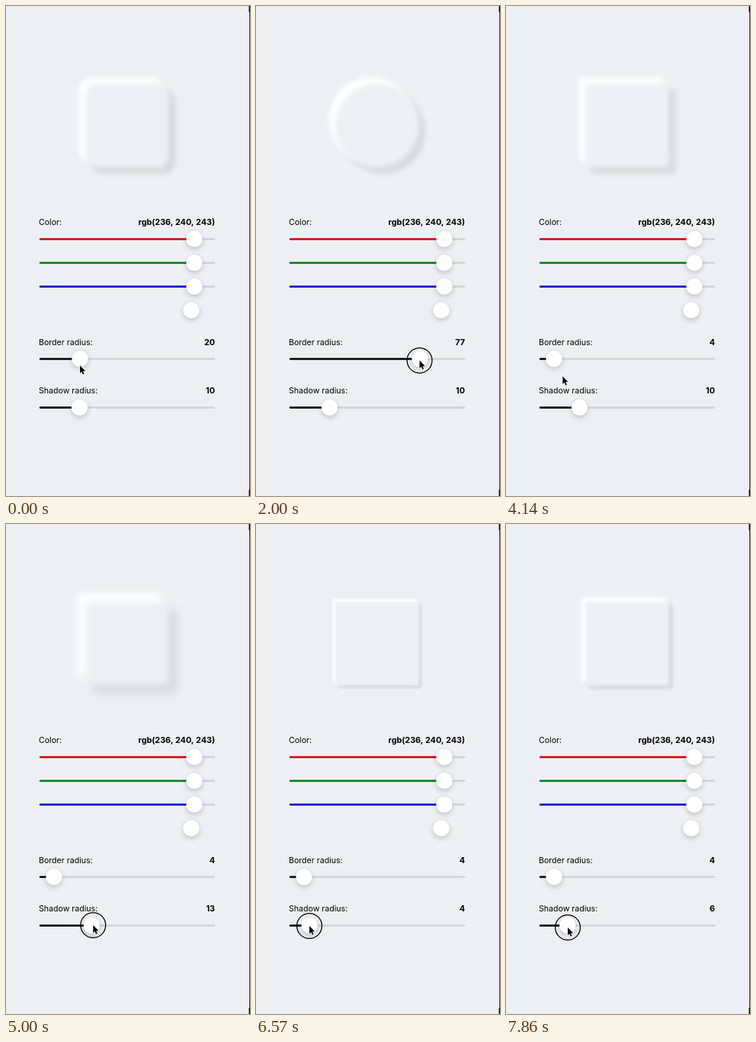
An HTML page with a canvas that plays this animation: 320 px wide and 640 px high, repeating every 8000 ms.

```html
<!DOCTYPE html>
<html lang="en">
<head>
<meta charset="utf-8">
<title>Soft shadow controls</title>
<style>
html, body { margin: 0; width: 100%; height: 100%; overflow: hidden; background: #ecf0f4; }
canvas { display: block; width: 320px; height: 640px; }
</style>
</head>
<body>
<canvas id="stage"></canvas>
<script>
const LOOP = 8000, FPS = 7;
const BG = '#ecf0f4';
const SCALE = 0.785; // points to stage pixels
const TRACK = { left: 44, right: 274, min: 54.5, span: 209 };
const THUMB_LAG = 38, LABEL_LAG = 73;

// Pointer path as [time, position] stops, eased between stops
const pathX = [
  [0, 97], [440, 97], [1900, 215], [1950, 215], [3472, 63], [3940, 63], [4460, 96.5],
  [4500, 96.5], [5400, 127], [6570, 70], [6600, 70], [7050, 51], [7100, 51], [7860, 81]
];
const pathY = [
  [0, 469.5], [285, 463], [3940, 463], [4460, 524], [5570, 524], [6570, 525], [7860, 527]
];

const canvas = document.getElementById('stage');
const ctx = canvas.getContext('2d');
const dpr = window.devicePixelRatio || 1;
canvas.width = 320 * dpr;
canvas.height = 640 * dpr;

const clamp = (v, lo, hi) => Math.min(hi, Math.max(lo, v));

function follow(path, t) {
  if (t <= path[0][0]) return path[0][1];
  for (let i = 1; i < path.length; i++) {
    const [t0, a] = path[i - 1], [t1, b] = path[i];
    if (t <= t1) {
      const u = (t - t0) / (t1 - t0);
      return a + (b - a) * u * u * (3 - 2 * u);
    }
  }
  return path[path.length - 1][1];
}

const borderX = t => follow(pathX, clamp(t, 440, 3900));
const shadowX = t => follow(pathX, Math.max(t, 4460));
const ratio = x => clamp((x - TRACK.min) / TRACK.span, 0, 1);

function text(str, x, y, bold) {
  ctx.font = bold ? '700 10.8px Inter, sans-serif' : '400 10.6px Inter, sans-serif';
  ctx.textAlign = bold ? 'right' : 'left';
  ctx.fillStyle = '#000';
  ctx.fillText(str, x, y);
}

function line(x0, x1, y, color) {
  ctx.strokeStyle = color;
  ctx.lineWidth = 2.4;
  ctx.lineCap = 'round';
  ctx.beginPath();
  ctx.moveTo(x0 + 1, y);
  ctx.lineTo(x1 - 1, y);
  ctx.stroke();
}

function thumb(x, y) {
  ctx.save();
  ctx.shadowColor = 'rgba(0,0,0,0.2)';
  ctx.shadowBlur = 7 * dpr;
  ctx.shadowOffsetY = 2.5 * dpr;
  ctx.fillStyle = '#fff';
  ctx.beginPath();
  ctx.arc(x, y, 10.6, 0, Math.PI * 2);
  ctx.fill();
  ctx.restore();
}

function slider(x, y, color) {
  const knob = clamp(x, TRACK.min, TRACK.min + TRACK.span);
  line(TRACK.left, TRACK.right, y, '#d0d4d7');
  line(TRACK.left, knob, y, color);
  thumb(knob, y);
}

// Only the blurred shadow lands on stage; the casting shape stays outside
function blurBox(shift, sigma, radius, color) {
  const away = 1000, size = 110;
  ctx.save();
  ctx.shadowColor = color;
  ctx.shadowBlur = 2 * sigma * dpr;
  ctx.shadowOffsetX = away * dpr;
  ctx.fillStyle = '#000';
  ctx.beginPath();
  ctx.roundRect(104 + shift - away, 101 + shift, size, size, Math.min(radius, size / 2));
  ctx.fill();
  ctx.restore();
}

function softBox(radius, shadow) {
  const d = shadow * SCALE, sigma = d / 2, r = radius * SCALE;
  blurBox(d, sigma, r, 'rgba(0,0,0,0.1)');
  blurBox(-d, sigma, r, '#fff');
  // Restore the dark side where the light layer covers it
  blurBox(0, sigma, r, BG);
}

function pointer(x, y, pressed) {
  if (pressed) {
    ctx.strokeStyle = '#000';
    ctx.lineWidth = 1.3;
    ctx.beginPath();
    ctx.arc(x, y, 16.4, 0, Math.PI * 2);
    ctx.stroke();
  }
  const arrow = [[0, 0], [0, 10.2], [2.3, 8.1], [3.8, 11.8], [5.5, 11.1], [4, 7.5], [7.1, 7.3]];
  ctx.beginPath();
  arrow.forEach(([dx, dy]) => ctx.lineTo(x + dx, y + dy));
  ctx.closePath();
  ctx.lineJoin = 'round';
  ctx.strokeStyle = '#fff';
  ctx.lineWidth = 1.4;
  ctx.stroke();
  ctx.fillStyle = '#000';
  ctx.fill();
}

function windowEdge() {
  ctx.fillStyle = '#37393b';
  ctx.fillRect(319, 0, 1, 640);
  ctx.fillStyle = '#000';
  ctx.fillRect(318.6, 0, 1.4, 8);
  ctx.fillRect(318.6, 632, 1.4, 8);
}

function draw(t) {
  ctx.setTransform(dpr, 0, 0, dpr, 0, 0);
  ctx.fillStyle = BG;
  ctx.fillRect(0, 0, 320, 640);

  const radius = Math.round(ratio(borderX(t - LABEL_LAG)) * 100);
  const shadow = Math.round(ratio(shadowX(t - LABEL_LAG)) * 50);
  softBox(radius, shadow);

  text('Color:', 43, 286.3);
  text('rgb(236, 240, 243)', 274, 286.3, true);
  slider(247, 304.5, '#e0000b');
  slider(247, 335.5, '#008014');
  slider(247, 366.5, '#0c00d6');
  thumb(243, 397.5);

  text('Border radius:', 43, 442.8);
  text(radius, 274, 442.8, true);
  slider(borderX(t - THUMB_LAG), 461, '#000');

  text('Shadow radius:', 43, 506.3);
  text(shadow, 274, 506.3, true);
  slider(shadowX(t - THUMB_LAG), 524.5, '#000');

  windowEdge();
  const pressed = (t >= 280 && t < 3700) || t >= 4500;
  pointer(follow(pathX, t), follow(pathY, t), pressed);
}

const start = performance.now();

function tick() {
  const t = (performance.now() - start) % LOOP;
  const step = Math.floor((t + 5) * FPS / 1000) % (LOOP * FPS / 1000);
  draw(step * 1000 / FPS);
  requestAnimationFrame(tick);
}
tick();
</script>
</body>
</html>
```
